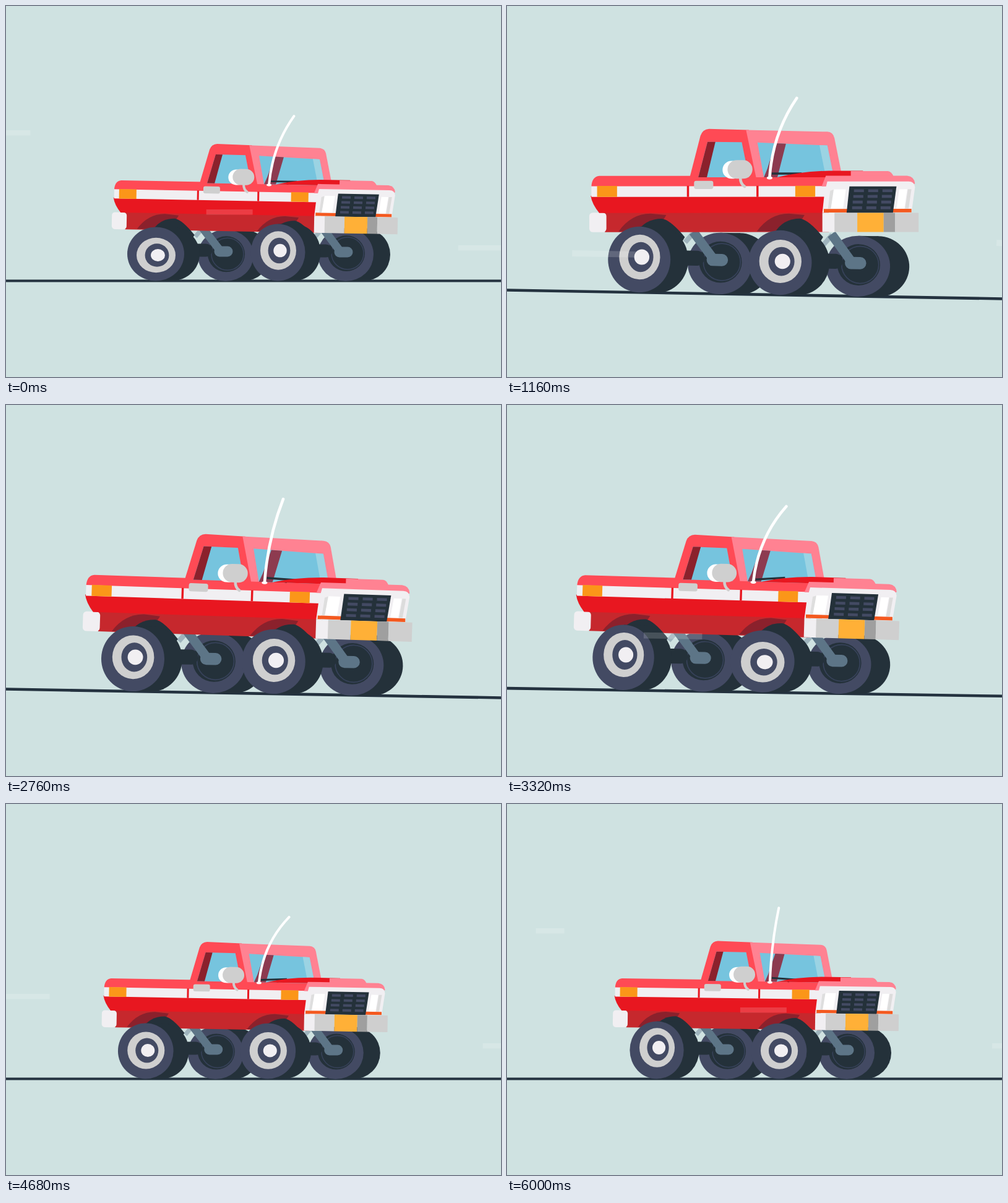
Write an HTML page that moves like this. It is 800 px wide and 600 px high and loops after 6.04 s.

```html
<!DOCTYPE html>
<html lang="en">
<head>
<meta charset="utf-8">
<title>Pickup on the road</title>
<style>
  html, body { margin: 0; width: 100%; height: 100%; overflow: hidden; background: #cfe2e1; }
  svg { display: block; width: 800px; height: 600px; }
</style>
</head>
<body>
<svg id="stage" viewBox="0 0 800 600" xmlns="http://www.w3.org/2000/svg"></svg>
<script>
const LOOP = 6040;
const BOUNCES = 13;
const TAU = Math.PI * 2;
const C = {
  ink: '#24313a', navy: '#434a63', grey: '#cfcfcf', white: '#f1eff2', steel: '#5d7587',
  red: '#e81720', deep: '#c6282d', coral: '#ff4a55', pink: '#ff8292', wine: '#8b212c',
  glass: '#76c4de', orange: '#fb9619', amber: '#ffb037'
};

const poly = (fill, points) => `<polygon fill="${fill}" points="${points}"/>`;
const path = (fill, d) => `<path fill="${fill}" d="${d}"/>`;
const rect = (fill, x, y, w, h, r = 0) =>
  `<rect fill="${fill}" x="${x}" y="${y}" width="${w}" height="${h}" rx="${r}"/>`;
const stroke = (color, width, d, cap = 'round') =>
  `<path fill="none" stroke="${color}" stroke-width="${width}" stroke-linecap="${cap}" stroke-linejoin="round" d="${d}"/>`;
const wheel = (id, fills) =>
  `<g id="${id}"><rect fill="${C.ink}"/>${fills.map(f => `<ellipse fill="${f}"/>`).join('')}</g>`;

// All truck parts are laid out with the rear bumper's left edge at x = 164.
const HOME_X = 164;

const suspension = (x, y) =>
  stroke('#9fb4bd', 7, `M${x + 3} 359L${x - 9} 373`, 'butt') +
  stroke(C.ink, 21, `M${x - 22} ${y - 2}H${x + 8}`) +
  stroke(C.steel, 13, `M${x + 2} 358L${x + 29} ${y - 4}`, 'butt') +
  stroke(C.steel, 17, `M${x + 30} ${y}H${x + 43}`);

const arch = x =>
  path(C.wine, `M${x - 33} 360Q${x - 15} 335 ${x + 12} 335L${x + 34} 337L${x + 20} 360Z`) +
  path(C.ink, `M${x - 8} 362Q${x + 4} 342 ${x + 28} 342Q${x + 40} 344 ${x + 60} 368L${x + 50} 385H${x}Z`);

function grille() {
  let bars = '';
  for (let row = 0; row < 4; row++)
    for (let col = 0; col < 3; col++) {
      const y = 303 + row * 8;
      bars += `M${536 + col * 20 - (y - 297) * 0.11} ${y}h14`;
    }
  return poly(C.ink, '529,297 595,297 590,334 525,334') + stroke(C.navy, 4, bars, 'butt');
}

const cab =
  path(C.coral, 'M305 284L320 228Q323 219 332 218.500L388 220L404 284Z') +
  path(C.pink, 'M384 220L498 222.500Q506 223 508 231L519 284H398Z') +
  poly(C.glass, '330,236 378,236.500 388,284 317,284') +
  poly(C.wine, '330,236 341,236 329,284 317,284') +
  poly(C.glass, '400,237 498,241 507,284 409,284') +
  poly('#9bd3e3', '487,240.500 498,241 507,284 496,284') +
  poly('#8d3b50', '425,238 440,238.600 428,284 409,284 414,272') +
  `<g id="steering">${stroke(C.ink, 3, 'M420 279H462M447 279V284', 'butt')}</g>`;

const body =
  poly(C.deep, '178,332 500,332 500,361 186,361') +
  rect(C.white, 164, 333.5, 24, 27.5, 5) +
  path(C.red, 'M166 310H500L494 334H178Q168 322 166 310Z') +
  rect(C.white, 167, 296, 333, 15.500) +
  path(C.coral, 'M167 296.500Q168 283 178 282H500V296.500Z') +
  rect(C.orange, 175, 296, 28, 15.5) + rect(C.orange, 453, 296, 28, 15.5) +
  stroke(C.red, 3, 'M302.500 296V311.500M400 296V311.500', 'butt') +
  `<g id="cab">${cab}</g>` +
  path(C.red, 'M428 284Q460 276 500 275H548V284Z') +
  path(C.pink, 'M531 284V275.500H583Q588 276 591 283Z') +
  path(C.pink, 'M490 297L496 282H610Q620 283 621 293L610 297Z') +
  path(C.white, 'M498 290H612Q620 290 621 298L616 334H491L494 306Z') +
  poly('#dedede', '502,303 508,301 503,328 499,328') +
  poly('#ffffff', '507,301 524,301 520,328 503,328') +
  poly('#ffffff', '599,301 610,301 606,328 595,328') +
  poly('#dcdcdc', '611,301 616,301 612,328 607,328') +
  stroke('#f4591f', 5, 'M493 331H616', 'butt') +
  grille() +
  rect(C.white, 491, 334, 18, 27) + rect(C.grey, 508, 334, 32, 27) +
  rect(C.amber, 540, 334, 37, 27) + rect('#9f9f9f', 577, 334, 16, 27) +
  rect(C.grey, 593, 334, 33, 27) +
  rect(C.grey, 311, 289, 27, 11.5, 3) +
  arch(238) + arch(432) +
  rect('#ffffff', 351, 261, 28, 25, 12.5) + rect(C.grey, 358, 260, 35, 26, 13) +
  stroke(C.grey, 4, 'M376 285Q376 293 382 297') +
  `<ellipse fill="#fff" cx="417" cy="285" rx="4" ry="2"/>` +
  `<path id="antenna" fill="none" stroke="#fff" stroke-width="4" stroke-linecap="round"/>`;

// Wind streaks: row, length, a moment and the left edge at that moment.
const STREAKS = [
  [201, 46, 6000, 48], [387, 70, 6040, 732], [329, 75, 6040, 325],
  [387, 90, 1160, 147], [362, 90, 1160, 742], [387, 70, 2160, 171],
  [362, 83, 3320, 245], [387, 139, 4080, 579], [307, 90, 4080, 780],
  [331, 70, 4080, 155], [387, 51, 5240, 27], [362, 150, 5240, 652]
];

const $ = id => document.getElementById(id);
$('stage').innerHTML =
  rect('#cfe2e1', 0, 0, 800, 600) +
  `<g id="camera">${stroke('#24323f', 4, 'M-200 444.500H1000')}
   <g id="truck">
     ${wheel('farRear', [C.ink, C.navy, C.ink])}${wheel('farFront', [C.ink, C.navy, C.ink])}
     ${suspension(308, 397)}${suspension(502, 398)}
     <g id="body">${body}</g>
     ${wheel('nearRear', [C.ink, C.navy, C.grey, C.navy, C.white])}
     ${wheel('nearFront', [C.ink, C.navy, C.grey, C.navy, C.white])}
   </g>
   <g id="streaks">${STREAKS.map(([y, w]) => rect('#fff', 0, y, w, 8.5)).join('')}</g></g>`;
for (const id of ['farRear', 'farFront'])
  $(id).insertAdjacentHTML('beforeend',
    `<ellipse fill="none" stroke="#37425a" stroke-width="1.5"/>`);

// Smooth periodic curve through the given knots.
function curve(knots, values, period, x) {
  const n = knots.length;
  const at = i => knots[((i % n) + n) % n] + Math.floor(i / n) * period;
  const val = i => values[((i % n) + n) % n];
  const slope = i => (val(i + 1) - val(i - 1)) / (at(i + 1) - at(i - 1));
  let i = 0;
  while (i < n - 1 && x >= knots[i + 1]) i++;
  const span = at(i + 1) - at(i), u = (x - at(i)) / span, v = 1 - u;
  return val(i) * v * v * (1 + 2 * u) + val(i + 1) * u * u * (3 - 2 * u) +
    span * u * v * (slope(i) * v - slope(i + 1) * u);
}

const PHASES = [0, 0.146, 0.278, 0.497, 0.649, 0.782, 0.914];
const SWING = [38, 44, -10, 38, 24, -37, 12];
const REAR_HEIGHT = [87, 92.8, 87.7, 92.5, 87.3, 89.7, 93];
const FRONT_HEIGHT = [92, 88, 93, 90.7, 93, 87, 89.7];
const DRIFT_TIMES = [0, 1160, 2160, 2600, 3320, 3700, 4080, 4520, 5160, 5800];
const DRIFT = [171, 169, 172.5, 166, 144.3, 145, 149, 152.5, 162.5, 170.5];

const ease = (t, from, to) => {
  const u = Math.min(1, Math.max(0, (t - from) / (to - from)));
  return 0.5 - 0.5 * Math.cos(Math.PI * u);
};

function set(el, attrs) {
  for (const key in attrs) el.setAttribute(key, attrs[key]);
}

function setWheel(id, height, depth, discs) {
  const [block, ...ellipses] = $(id).children;
  const [cx, cy, , ry] = discs[0];
  set(block, { x: cx - depth, y: cy - ry, width: depth, height: ry * 2 });
  discs.forEach(([x, y, rx, r], i) => set(ellipses[i], { cx: x, cy: y, rx, ry: r }));
}

function nearWheel(id, cx, height) {
  const k = height - 90, ry = height / 2, cy = 444.5 - ry;
  const rx = 44.8 - 0.4 * k, hubY = 398.5 - 1.5 * k;
  setWheel(id, height, 26, [
    [cx + 26, cy, rx - 1, ry], [cx, cy, rx, ry],
    [cx + 0.5, hubY, 30 - 0.5 * k, 30 + 0.6 * k],
    [cx + 2, hubY, 18.5 - 0.3 * k, 20 + 0.4 * k],
    [cx + 3.5, hubY, 11 - 0.15 * k, 10.5 + 0.15 * k]
  ]);
}

function farWheel(id, cx, height) {
  const h = 85 + 0.5 * (height - 90), ry = h / 2, cy = 445 - ry;
  setWheel(id, h, 28, [
    [cx + 28, cy, 44, ry], [cx, cy, 45, ry],
    [cx + 1, cy - 2, 30, 29], [cx + 3, cy - 2, 26, 26]
  ]);
}

function draw(t) {
  const phase = (t * BOUNCES / LOOP) % 1;
  const track = values => curve(PHASES, values, 1, phase);
  const wave = Math.sin(TAU * phase);

  const zoom = ease(t, 150, 1050) - ease(t, 3150, 4020);
  $('camera').setAttribute('transform',
    `translate(400 300) rotate(${zoom}) scale(${1 + 0.152 * zoom}) translate(-400 -300)`);
  $('truck').setAttribute('transform',
    `translate(${curve(DRIFT_TIMES, DRIFT, LOOP, t) - HOME_X} 0)`);

  const tilt = 1.06 * Math.cos(TAU * (phase - 0.03));
  $('body').setAttribute('transform', `rotate(${tilt} 175 347)`);
  const cabHeight = 65.5 - 2 * Math.cos(TAU * phase) - wave;
  $('cab').setAttribute('transform',
    `translate(0 283) scale(1 ${cabHeight / 65}) translate(0 -283)`);
  $('steering').setAttribute('transform', `rotate(${-6.3 * wave} 441 279)`);

  const swing = track(SWING);
  $('antenna').setAttribute('d',
    `M417 284Q${417 + swing * 0.12} 222 ${417 + swing} ${163.5 + swing * swing * 0.0065}`);

  const rear = track(REAR_HEIGHT), front = track(FRONT_HEIGHT);
  nearWheel('nearRear', 235, rear);
  nearWheel('nearFront', 432.5, front);
  farWheel('farRear', 348, rear);
  farWheel('farFront', 542, front);

  [...$('streaks').children].forEach((el, i) => {
    const [, , moment, x] = STREAKS[i];
    let dt = (t - moment) % LOOP;
    if (dt < -LOOP / 2) dt += LOOP;
    set(el, { x: x - 1.33 * dt, opacity: 0.16 });
  });
}

const start = performance.now();
function tick(now) {
  draw(Math.max(0, now - start) % LOOP);
  requestAnimationFrame(tick);
}
draw(0);
requestAnimationFrame(tick);
</script>
</body>
</html>
```
